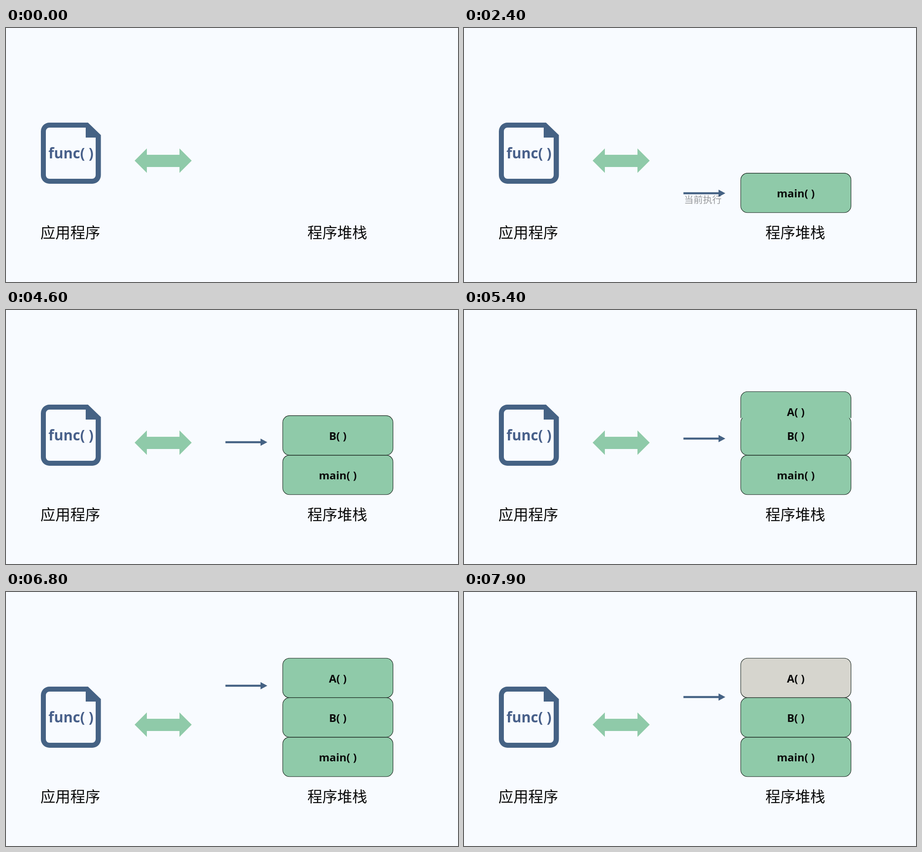
Animation, 998 px wide and 561 px high, one loop 8000 ms. Source, as an HTML page with a canvas:

```html
<!DOCTYPE html>
<html lang="zh-CN">
<head>
<meta charset="utf-8">
<title>程序堆栈</title>
<style>
html, body { margin: 0; width: 100%; height: 100%; overflow: hidden; background: #f8fbff; }
canvas { display: block; }
</style>
</head>
<body>
<canvas id="stage" width="998" height="561"></canvas>
<script>
const ctx = document.getElementById('stage').getContext('2d');
const LOOP = 8000, STEP = 100;
const BG = '#f8fbff', BLUE = '#456284', GREEN = '#8fcaa9', INK = '#0a0a0a';
const LATIN = '"Open Sans", "Noto Sans", sans-serif';
const CJK = '"Noto Sans CJK SC", "Noto Sans CJK", sans-serif';
const BOX = { x: 611, w: 243.5, h: 87.2, r: 15 };

const progress = (t, start, length) => Math.min(1, Math.max(0, (t - start) / length));
const smooth = p => p < 0.5 ? 2 * p * p : 1 - 2 * (1 - p) * (1 - p);
const mix = (a, b, p) => a + (b - a) * p;

function text(str, x, y, font, color = INK, align = 'center') {
  ctx.font = font;
  ctx.fillStyle = color;
  ctx.textAlign = align;
  ctx.fillText(str, x, y);
}

function polygon(points, color) {
  ctx.beginPath();
  points.forEach(([x, y]) => ctx.lineTo(x, y));
  ctx.closePath();
  ctx.fillStyle = color;
  ctx.fill();
}

function drawFile() {
  ctx.fillStyle = BLUE;
  ctx.beginPath();
  ctx.moveTo(181, 209);
  ctx.lineTo(209.5, 236.5);
  ctx.arcTo(209.5, 344, 190, 344, 19);
  ctx.arcTo(77, 344, 77, 325, 19);
  ctx.arcTo(77, 209, 96, 209, 19);
  ctx.closePath();
  ctx.fill();

  ctx.fillStyle = BG;
  ctx.beginPath();
  ctx.moveTo(176, 220);
  ctx.lineTo(176, 242);
  ctx.lineTo(198, 242);
  ctx.arcTo(198, 333, 190, 333, 8);
  ctx.arcTo(88, 333, 88, 325, 8);
  ctx.arcTo(88, 220, 96, 220, 8);
  ctx.closePath();
  ctx.fill();
  text('func( )', 143.5, 288, 'bold 31.5px ' + LATIN, '#48608a');
}

function drawDoubleArrow() {
  polygon([[284, 293], [311, 266], [311, 280], [383, 280], [383, 266],
    [410, 293], [383, 320], [383, 307], [311, 307], [311, 320]], GREEN);
}

// The box slides up into its slot and is clipped just below it.
function drawCall(name, top, p, fill = GREEN) {
  if (p <= 0) return;
  const y = top + BOX.h * (1 - p);
  ctx.save();
  ctx.beginPath();
  ctx.rect(BOX.x - 2, top - 2, BOX.w + 4, BOX.h + 7);
  ctx.clip();
  ctx.beginPath();
  ctx.roundRect(BOX.x, y, BOX.w, BOX.h, BOX.r);
  ctx.fillStyle = fill;
  ctx.fill();
  ctx.strokeStyle = '#16211b';
  ctx.lineWidth = 1.1;
  ctx.stroke();
  text(name, 732.5, y + 53.5, 'bold 24px ' + LATIN);
  ctx.restore();
}

function drawPointer(y, alpha) {
  ctx.globalAlpha = alpha;
  polygon([[484.5, y - 2.3], [562, y - 2.3], [562, y - 8], [577, y],
    [562, y + 8], [562, y + 2.3], [484.5, y + 2.3]], BLUE);
  ctx.globalAlpha = 1;
}

function draw(t) {
  ctx.fillStyle = BG;
  ctx.fillRect(0, 0, 998, 561);
  drawFile();
  drawDoubleArrow();
  text('应用程序', 76, 464, '33px ' + CJK, INK, 'left');
  text('程序堆栈', 665.5, 464, '33px ' + CJK, INK, 'left');

  const gray = progress(t, 6950, 500);
  const rgb = [mix(143, 214, gray), mix(202, 213, gray), mix(169, 206, gray)].map(Math.round);
  drawCall('main( )', 320.6, progress(t, 400, 500));
  drawCall('B( )', 233.4, progress(t, 3055, 500));
  drawCall('A( )', 146.2, progress(t, 5095, 500), `rgb(${rgb})`);

  const enter = progress(t, 800, 500);
  const lift = 16 * (1 - enter) * (1 - enter);
  const y = 365 + lift
    - 73 * smooth(progress(t, 3555, 1000))
    - 85 * smooth(progress(t, 5183, 1000))
    + 85 * smooth(progress(t, 7517, 1000));
  drawPointer(y, Math.min(1, enter * 1.7));

  ctx.globalAlpha = enter * (1 - progress(t, 2100, 500));
  text('当前执行', 486, 386.5 + lift, '20.7px ' + CJK, INK, 'left');
  ctx.globalAlpha = 1;
}

const origin = performance.now();
function tick(now) {
  const t = Math.max(0, now - origin) % LOOP;
  draw(Math.floor(t / STEP) * STEP);
  requestAnimationFrame(tick);
}
draw(0);
requestAnimationFrame(tick);
</script>
</body>
</html>
```
